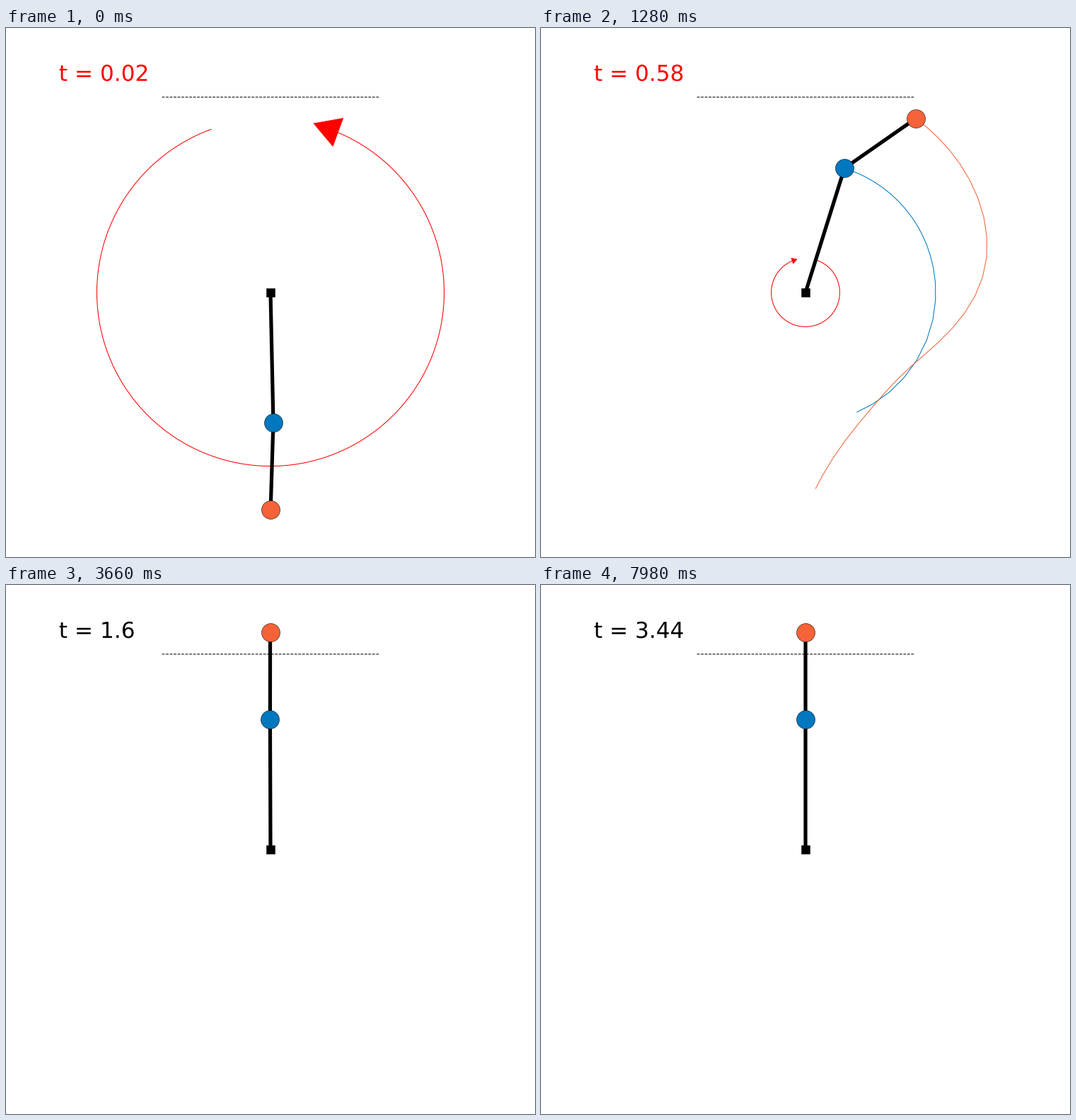
Animation, 748 px wide and 748 px high, one loop 8000 ms. Source, as a matplotlib script:

```python
import numpy as np
import matplotlib.pyplot as plt
from matplotlib.animation import FuncAnimation
from matplotlib.patches import Polygon
from matplotlib.patheffects import Normal

plt.rcParams["path.snap"] = False

HALF = 374                 # half the stage in pixels
UNIT = 613.8               # pixels per metre
L1, L2 = 0.3 * UNIT, 0.2 * UNIT
DT, STEPS, TRAIL = 0.02, 172, 25
CATCH = 39                 # step at which the upper link is upright
BLUE, ORANGE, RED = "#0077BE", "#f66338", "red"


def spline(x, keys, values, end_slope):
    """Cubic spline through the keys that starts at rest."""
    k, y = np.array(keys, float), np.array(values, float)
    h, n = np.diff(k), len(k)
    rise = np.diff(y) / h
    system, rhs = np.eye(n), np.zeros(n)
    for i in range(1, n - 1):
        system[i, i - 1:i + 2] = h[i], 2 * (h[i - 1] + h[i]), h[i - 1]
        rhs[i] = 3 * (h[i] * rise[i - 1] + h[i - 1] * rise[i])
    rhs[-1] = end_slope
    m = np.linalg.solve(system, rhs)
    i = np.clip(np.searchsorted(k, x, side="right") - 1, 0, n - 2)
    u = (x - k[i]) / h[i]
    return (y[i] + (y[i + 1] - y[i]) * u * u * (3 - 2 * u)
            + h[i] * u * (1 - u) * (m[i] * (1 - u) - m[i + 1] * u))


def polar(radius, degrees):
    a = np.radians(degrees)
    return np.array([radius * np.cos(a), radius * np.sin(a)])


# Link angles from hanging down: a swing up through a few poses, then settling
step = np.arange(1, STEPS + 1)
swing = np.minimum(step, CATCH)
late = np.maximum(step - CATCH, 0)
poses = [0, 4, 8, 12, 16, 20, 24, 29, CATCH]
upper = spline(swing, poses,
               [0, 16.1, 49, 86.6, 111.3, 126.2, 143.3, 162.6, 180], 0.12)
lower = spline(swing, poses,
               [0, -20.8, -43, -25.5, 17.1, 61.1, 95.2, 124.9, 159], 2.9)
upper += 0.119 * late * np.exp(-(late / 16) ** 2 / 2)
lower += 21 * (1 - np.exp(-0.14 * late))
elbow = polar(L1, upper - 90)
tip = elbow + polar(L2, lower - 90)


def motor(n):
    """Torque: one dip during the push, then braking, then a fading sway."""
    if n <= 20:
        return 4 + 3 * np.cos(2 * np.pi * (n - 1) / 19)
    if n <= CATCH:
        return -1.87 + 8.87 * ((CATCH - n) / 19) ** 3
    s = n - CATCH
    return -1.87 * np.exp(-s / 43) * np.cos(np.pi * s / 12) if s < 30 else 0


fig = plt.figure(figsize=(20, 20), dpi=37.4, facecolor="white")
ax = fig.add_axes([0, 0, 1, 1])
ax.set_xlim(-HALF, HALF)
ax.set_ylim(-HALF, HALF)
ax.axis("off")


def line(color, width, z, x=(), y=(), **kw):
    return ax.plot(x, y, color=color, lw=width, zorder=z, snap=False, **kw)[0]


arc = line(RED, 2, 1)
head = Polygon(np.zeros((3, 2)), closed=True, color=RED, lw=1, zorder=1)
ax.add_patch(head)
trails = [line(c, 2, 2) for c in (BLUE, ORANGE)]
line("black", 2, 3, [-0.25 * UNIT, 0.25 * UNIT], [0.45 * UNIT] * 2, ls="--")
links = [line("black", 10, 4) for _ in range(2)]
line("black", 0, 5, [0], [0], marker="s", ms=25, mew=1)
joints = [line(c, 0, 6, marker="o", ms=50, mec="black", mew=1)
          for c in (BLUE, ORANGE)]
clock = ax.text(-0.8 * HALF, 0.8 * HALF, "", fontsize=60, zorder=7,
                family="DejaVu Sans", path_effects=[Normal()])

sweep = np.linspace(110, 430, 241)


def show_torque(tau):
    active = abs(tau) > 0.08
    arc.set_visible(active)
    head.set_visible(active)
    clock.set_color(RED if active else "black")
    radius = (0.1 * abs(tau) + 0.1) * UNIT / 2
    arc.set_data(*polar(radius, sweep))
    at, point = (70, 160) if tau > 0 else (110, 20)
    corners = polar(radius / 10, point + np.array([0, 120, 240]))
    head.set_xy(polar(radius, at) + corners.T)


def step_at(tick):
    # Every third step is held for five ticks, the others for one
    cycle, rest = divmod(tick - 1, 7)
    return 1 + 3 * cycle + max(0, rest - 4)


def draw(tick):
    i = step_at(tick)
    recent = slice(max(0, i - TRAIL + 1), i + 1)
    start = np.zeros(2)
    for path, trail, link, joint in zip((elbow, tip), trails, links, joints):
        end = path[:, i]
        trail.set_data(*path[:, recent])
        link.set_data(*zip(start, end))
        joint.set_data(*end[:, None])
        start = end
    show_torque(motor(i + 1))
    clock.set_text(f"t = {round(DT * (i + 1), 2)}")
    return []


anim = FuncAnimation(fig, draw, frames=400, interval=20,
                     init_func=lambda: draw(0), repeat=True, repeat_delay=0,
                     blit=False)
plt.show()
```
